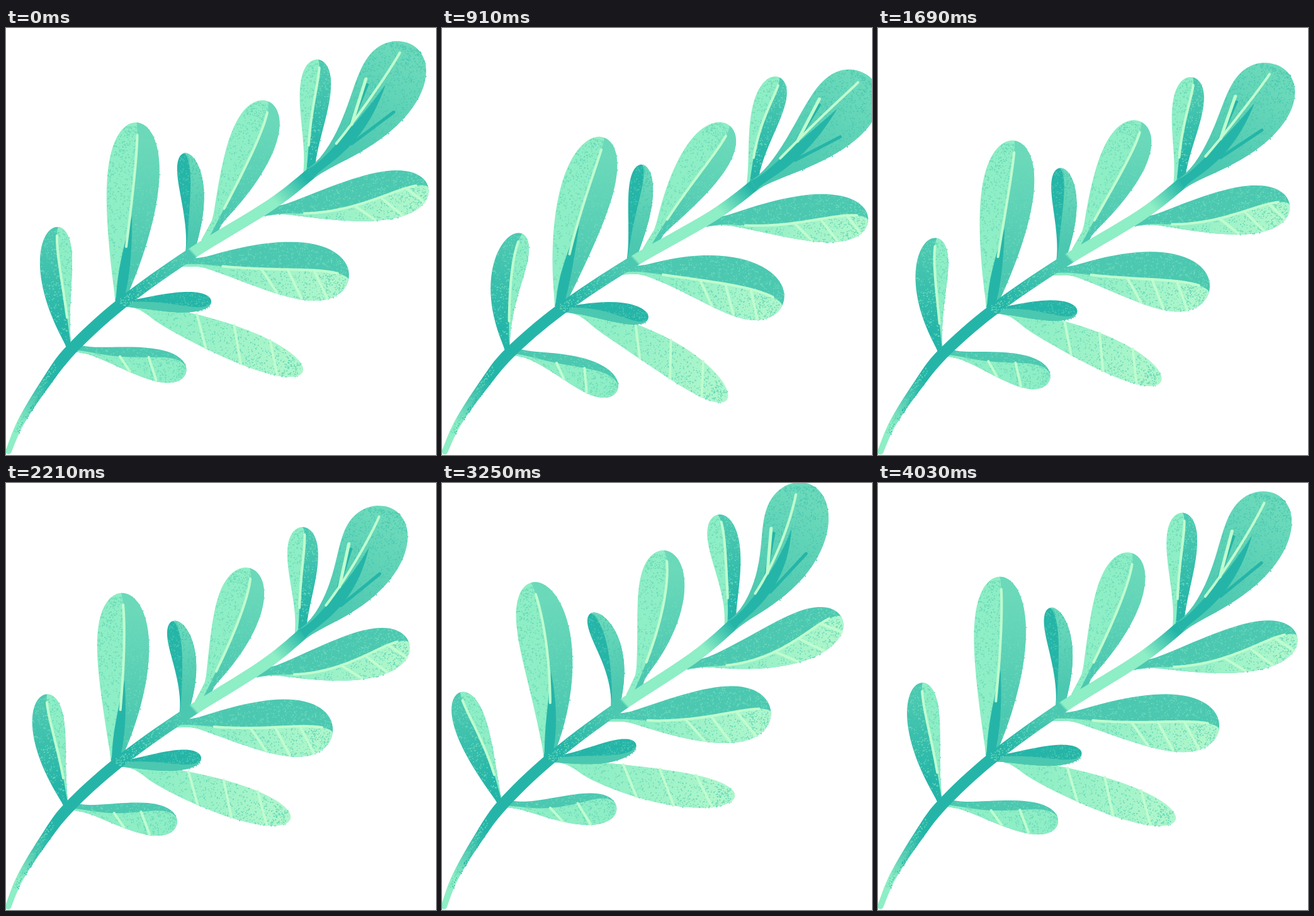
Write an HTML page with a canvas that moves like this. It is 683 px wide and 678 px high and loops after 4.16 s.

```html
<!DOCTYPE html>
<html lang="en">
<head>
<meta charset="utf-8">
<title>Swaying branch</title>
<style>
  html, body { margin: 0; width: 100%; height: 100%; overflow: hidden; background: #fff; }
  canvas { display: block; width: 683px; height: 678px; }
</style>
</head>
<body>
<canvas id="stage" width="683" height="678"></canvas>
<script>
const LOOP = 4160, STEP = 130, TAU = Math.PI * 2;
const LIGHT = '#8eeec5', SOFT = '#6bd9ba', MID = '#4cc8b1', DARK = '#25b5a8', PALE = '#c0fccf', TIP = '#aef6cb';

const ctx = document.getElementById('stage').getContext('2d');
const mix = (a, b, f) => a + (b - a) * f;

let seed = 7;
function rand() {
  seed = (seed * 16807) % 2147483647;
  return seed / 2147483647;
}

// One swing per loop: quick to fall clockwise, slower to come back
function swing(t) {
  const a = t / LOOP * TAU;
  return Math.sin(a) + 0.1 * Math.cos(a) + 0.12 * Math.sin(2 * a);
}
const swung = (t, shift = 0) => swing(t + shift) - swing(shift);

// Shift of a stem point: it grows, and the dip lags less, towards the top
function sway(x, t) {
  const r = x / 488;
  return [18 * r ** 0.7 * swung(t, 140), 13 * r ** 0.8 * swung(t, 400 * r - 750)];
}

// w: half width, neck: half width of the stalk, stalk: its share of the length,
// fat: lower is fuller near the root, bow: sideways bulge of the spine,
// split: place of the midrib across the leaf at root and tip (-1 to 1)
const base = {
  turn: 10, bow: 0, neck: 6, stalk: 0, fat: 0.85, split: [0, 0],
  left: [LIGHT, LIGHT], right: [MID, MID], grain: SOFT, vein: true
};
const leaves = [
  { root: [318, 341], tip: [415, 116], w: 36, bow: 0.02, neck: 9, stalk: 0.15, fat: 0.7, split: [0, 0.25], right: [MID, SOFT] },
  { root: [481, 232], tip: [495, 50], w: 24, neck: 9, fat: 1.1, split: [-0.5, 0.25], right: [DARK, MID] },
  { root: [181, 434], tip: [207, 150], w: 41, bow: 0.013, neck: 8, fat: 0.7, split: [-0.1, 0.1], right: [MID, SOFT], flash: [0.48, 0.08] },
  { root: [291, 362], tip: [282, 199], w: 19, bow: 0.065, neck: 7, split: [-1, 0.4], left: [DARK, DARK], right: [MID, SOFT], grain: MID, vein: false },
  { root: [101, 509], tip: [83, 316], w: 25.5, turn: 13, bow: -0.055, neck: 4, split: [0.9, -0.1], left: [DARK, MID], right: [LIGHT, LIGHT] },
  { root: [406, 292], tip: [671, 254], w: 38, turn: 8, bow: 0.01, neck: 7, stalk: 0.1, split: [1, -0.35], left: [MID, MID], right: [LIGHT, TIP], ribs: [0.55, 0.16, 3] },
  { root: [277, 372], tip: [544, 400], w: 45, turn: 7, bow: -0.03, neck: 7, stalk: 0.1, split: [0.5, -0.25], left: [MID, MID], right: [LIGHT, TIP], ribs: [0.48, 0.155, 3] },
  { root: [104, 507], tip: [286, 547], w: 25, turn: 9, bow: -0.01, stalk: 0.1, fat: 1, split: [0.6, -0.9], left: [MID, MID], right: [LIGHT, LIGHT], vein: false, ribs: [0.42, 0.24, 2] },
  { root: [200, 440], tip: [471, 546], w: 27, turn: 9, bow: -0.01, neck: 3, stalk: 0.08, fat: 0.5, split: [-1, -1], right: [LIGHT, TIP], vein: false, ribs: [0.35, 0.21, 3] },
  { root: [188, 438], tip: [326, 434], w: 16, turn: 8, neck: 5, split: [-0.6, 0.8], left: [DARK, DARK], grain: MID, vein: false },
  { root: [484, 231], tip: [636, 23], w: 51, bow: 0.085, neck: 9, fat: 1.1, split: [-0.7, -0.08], left: [MID, SOFT], right: [MID, SOFT], grain: MID, flash: [0.72, -0.1],
    strokes: [[0.66, -0.62, 0.34, -0.4, DARK], [0.69, -0.73, 0.39, -0.45, PALE], [0.6, 0.6, 0.3, 0.25, DARK]] }
].map(spec => {
  const l = { ...base, ...spec };
  l.size = Math.hypot(l.tip[0] - l.root[0], l.tip[1] - l.root[1]);
  l.angle = Math.atan2(l.tip[1] - l.root[1], l.tip[0] - l.root[0]);
  const x = 2 * l.fat / (2 * l.fat + 3);
  l.peak = x ** (l.fat / 3) * Math.sqrt(1 - x);
  l.dots = Array.from({ length: l.size * l.w * 0.07 }, () => [Math.sqrt(rand()) * 0.98, rand() * 2 - 1, 1 + rand()]);
  return l;
});

function halfWidth(l, u) {
  const v = Math.max(0, (u - l.stalk) / (1 - l.stalk));
  const blade = l.w * v ** l.fat * Math.sqrt(Math.max(0, 1 - v ** 3)) / l.peak;
  return Math.hypot(l.neck * Math.sqrt(1 - u), blade);
}

// Returns a function from leaf coordinates (along, across) to the stage at time t
function pose(l, t) {
  const q = swung(t), [dx, dy] = sway(l.root[0], t);
  const angle = l.angle + l.turn * q * Math.PI / 180;
  const size = l.size * (1 - 0.032 * (1 - Math.cos(t / LOOP * TAU)));
  const bulge = l.size * (l.bow - 0.035 * q);
  const c = Math.cos(angle), s = Math.sin(angle);
  return (u, k) => {
    const slope = 4 * bulge * (1 - 2 * u) / size, n = Math.hypot(1, slope);
    const w = halfWidth(l, u) * k / n;
    const x = size * u - w * slope, y = 4 * bulge * u * (1 - u) + w;
    return [l.root[0] + dx + x * c - y * s, l.root[1] + dy + x * s + y * c];
  };
}

function trace(pts) {
  ctx.beginPath();
  pts.forEach(p => ctx.lineTo(...p));
}

// Points along the leaf from u0 to u1, closer together near the end
const along = (at, k, u0, u1) => Array.from({ length: 33 }, (_, i) => {
  const u = mix(u0, u1, Math.sin(i / 32 * Math.PI / 2));
  return at(u, k(u));
});

function band(at, lo, hi, end, fill) {
  trace([...along(at, lo, 0, end), ...along(at, hi, 0, end).reverse()]);
  ctx.fillStyle = fill;
  ctx.fill();
}

function line(pts, colour, width) {
  trace(pts);
  ctx.strokeStyle = colour;
  ctx.lineWidth = width;
  ctx.stroke();
}

function shade(at, [from, to]) {
  const g = ctx.createLinearGradient(...at(0, 0), ...at(1, 0));
  g.addColorStop(0.2, from);
  g.addColorStop(0.9, to);
  return g;
}

function drawLeaf(l, t) {
  const at = pose(l, t), split = u => mix(...l.split, u);
  band(at, () => -1, () => 1, 1, shade(at, l.left));
  band(at, split, () => 1, 1, shade(at, l.right));
  ctx.fillStyle = l.grain;
  for (const [u, k, d] of l.dots) ctx.fillRect(...at(u, k), d, d);
  if (l.flash) {
    const [end, k] = l.flash;
    band(at, u => mix(-0.95, k, (u / end) ** 0.6), u => mix(0.9, k, (u / end) ** 0.5), end, DARK);
  }
  for (const [u0, k0, u1, k1, colour] of l.strokes || []) line([at(u0, k0), at(u1, k1)], colour, 5);
  if (l.vein) line(along(at, split, l.flash ? 0.45 - l.flash[0] * 0.3 : 0.25, 0.93), PALE, 4);
  const [first, gap, count] = l.ribs || [0, 0, 0];
  for (let i = 0; i < count; i++) {
    const u = first + gap * i, end = Math.min(0.96, u + 0.11);
    line([at(u, split(u)), at(end, 0.96)], PALE, 4);
  }
}

// Stem: centre points from foot to top
const stem = [[4, 672], [24, 625], [62, 565], [104, 510], [183, 438], [292, 360], [420, 281], [488, 228]];
const stemWidth = x => 4.5 + 4.6 * Math.min(1, x / 90);
const stemFill = ctx.createLinearGradient(5, 672, 500, 215);
[[0, LIGHT], [0.06, LIGHT], [0.13, MID], [0.19, DARK], [0.46, DARK], [0.6, MID],
 [0.632, MID], [0.638, LIGHT], [0.86, LIGHT], [0.95, DARK]
].forEach(([p, c]) => stemFill.addColorStop(p, c));

// Point on the smooth stem, v from 0 to 1, k across it
function stemAt(pts, v, k) {
  const n = pts.length - 1, i = Math.min(n - 1, Math.floor(v * n)), f = v * n - i;
  const [a, b, c, d] = [-1, 0, 1, 2].map(j => pts[Math.max(0, Math.min(n, i + j))]);
  const p = [0, 1].map(j => b[j] + f / 2 * (c[j] - a[j]
    + f * (2 * a[j] - 5 * b[j] + 4 * c[j] - d[j] + f * (3 * (b[j] - c[j]) + d[j] - a[j]))));
  const dx = mix(c[0] - a[0], d[0] - b[0], f), dy = mix(c[1] - a[1], d[1] - b[1], f);
  const w = k * stemWidth(p[0]) / Math.hypot(dx, dy);
  return [p[0] - dy * w, p[1] + dx * w];
}

const stemDots = Array.from({ length: 260 }, (_, i) => [
  i % 2 ? mix(0.1, 0.36, rand()) : mix(0.57, 0.71, rand()), rand() * 1.8 - 0.9]);

function drawStem(t) {
  const pts = stem.map(([x, y]) => { const [dx, dy] = sway(x, t); return [x + dx, y + dy]; });
  const side = k => Array.from({ length: 57 }, (_, i) => stemAt(pts, i / 56, k));
  trace([...side(-1), ...side(1).reverse()]);
  ctx.fillStyle = stemFill;
  ctx.fill();
  ctx.beginPath();
  ctx.arc(...pts[0], stemWidth(4), 0, TAU);
  ctx.fill();
  for (const [v, k] of stemDots) {
    ctx.fillStyle = v < 0.36 && k > 0 ? DARK : SOFT;
    ctx.fillRect(...stemAt(pts, v, k), 1.6, 1.6);
  }
}

function draw(t) {
  ctx.fillStyle = '#fff';
  ctx.fillRect(0, 0, 683, 678);
  ctx.lineCap = 'round';
  leaves.slice(0, -1).forEach(l => drawLeaf(l, t));
  drawStem(t);
  drawLeaf(leaves[leaves.length - 1], t);
}

const start = performance.now();
let shown = -1;
function tick() {
  const step = Math.floor(((performance.now() - start) % LOOP) / STEP);
  if (step !== shown) draw((shown = step) * STEP);
  requestAnimationFrame(tick);
}
tick();
</script>
</body>
</html>
```
